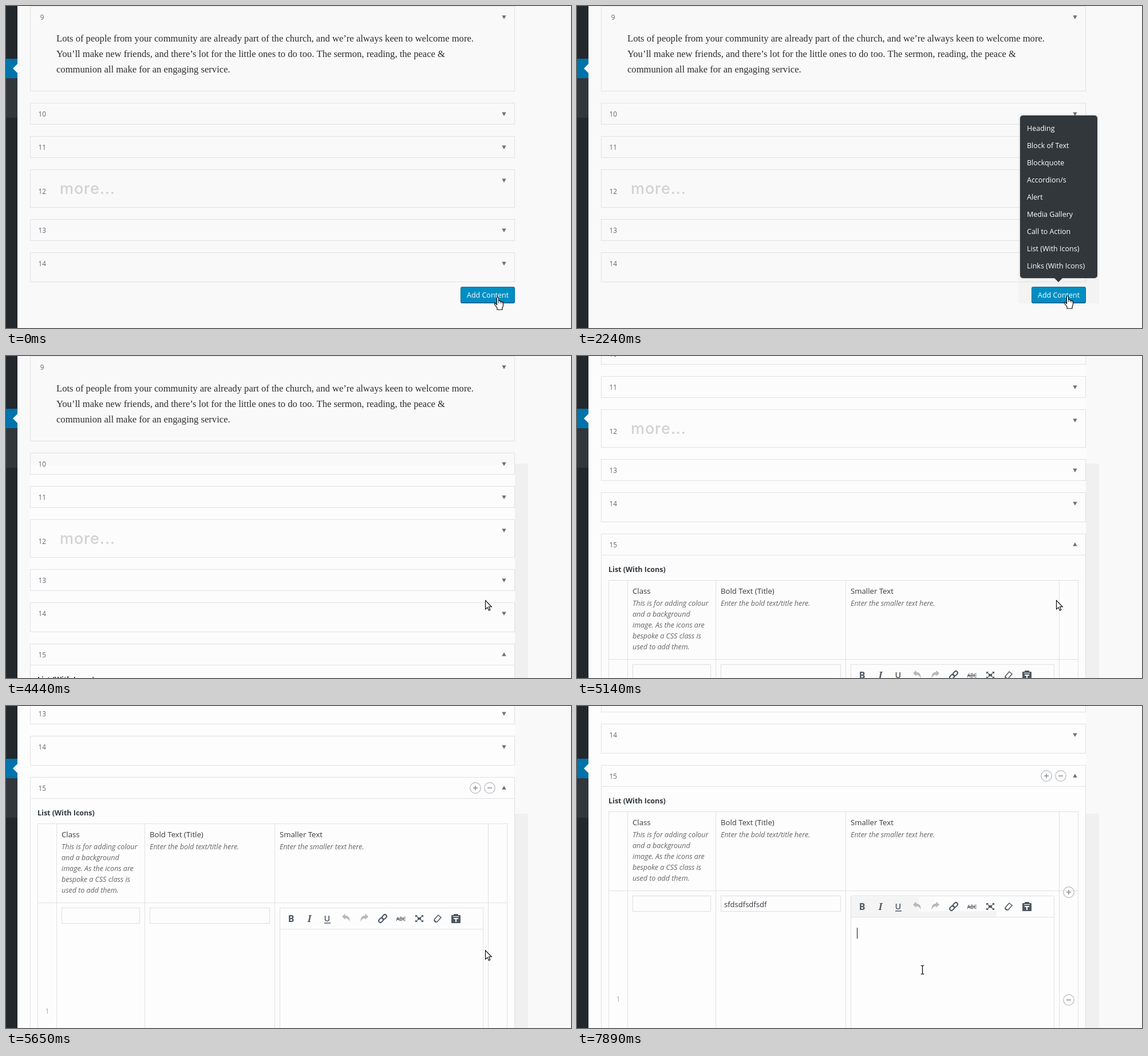
Write an HTML page with a canvas that moves like this. It is 987x562 px and loops after 8 s.

```html
<!DOCTYPE html>
<html lang="en">
<head>
<meta charset="utf-8">
<title>Adding a content block</title>
<style>
html, body { margin: 0; width: 100%; height: 100%; overflow: hidden; background: #f9f9f9; }
canvas { display: block; }
</style>
</head>
<body>
<canvas id="stage" width="987" height="562"></canvas>
<script>
const ctx = document.getElementById('stage').getContext('2d');
const LOOP = 8000;
const SANS = '"Open Sans", "Noto Sans", sans-serif';
const UI = '12.5px ' + SANS;
const LABEL = '11.7px ' + SANS;
const LINE = '#e1e1e1';
const ICON = '#4f5862';

// Page boxes: label, top, height, label baseline, toggle centre
const boxes = [
  [9, 0, 149, 24, 20], [10, 169, 38, 193, 189], [11, 227, 38, 251, 247],
  [12, 285, 67, 328, 305], [13, 372, 38, 396, 392], [14, 430, 52, 454, 450]
];
const story = [
  'Lots of people from your community are already part of the church, and we’re always keen to welcome more.',
  'You’ll make new friends, and there’s lot for the little ones to do too. The sermon, reading, the peace &',
  'communion all make for an engaging service.'
];
const menuItems = ['Heading', 'Block of Text', 'Blockquote', 'Accordion/s', 'Alert',
  'Media Gallery', 'Call to Action', 'List (With Icons)', 'Links (With Icons)'];
const classHelp = ['This is for adding colour', 'and a background', 'image. As the icons are',
  'bespoke a CSS class is', 'used to add them.'];
const typed = 'sfdsdfsdfsdf';

const scrollSteps = [[0, 0], [5040, 60], [5080, 128], [5140, 192], [5200, 300], [5320, 378], [5720, 399]];

// Pointer moves: start, end, x, y (equal times make a jump)
const moves = [
  [0, 0, 859, 508], [2240, 2240, 857, 506], [2270, 2270, 856, 505], [2540, 2540, 856, 503],
  [3350, 3950, 839, 430], [4280, 4280, 838, 427], [4440, 4440, 837, 426],
  [5740, 6240, 390, 341], [7420, 7740, 603, 460]
];

const handPath = new Path2D('M-1.5 2V13.5L-4 11.3Q-6.3 11 -5.5 13L-1 19V22H8V19Q10 16 9.5 10Q9 8 7 8.5' +
  'Q6.5 7 4.5 7.5Q3.5 6 1.5 6.7V2Q1.5 0 0 0T-1.5 2Z');
const handCreases = new Path2D('M1.5 6.7V11M4.5 7.5V11M7 8.5V11.5');
const arrowPath = new Path2D('M.5 .5V16L4 12.8L6.5 18L8.8 17L6.4 11.8H11.3Z');
const beamPath = new Path2D('M-3 -7.5H-1L0 -6.5L1 -7.5H3M0 -6.5V6.5M-3 7.5H-1L0 6.5L1 7.5H3');

const undoPath = new Path2D('M-7 -2.5L-1.5 -7.5V-4.3C4 -4.3 7 -1 6.5 7C5 2.5 2.5 .5 -1.5 .6V3Z');
const eraserPath = new Path2D('M-6 2L1 -6L6 -2L-1 6H-4L-6 4Z');
const expandPath = new Path2D('M-7 -6H-3L-7 -2ZM7 -6H3L7 -2ZM-7 6H-3L-7 2ZM7 6H3L7 2ZM-3 -2H3V2H-3Z');

function rect(x, y, w, h, color) {
  ctx.fillStyle = color;
  ctx.fillRect(x, y, w, h);
}

function frame(x, y, w, h, color = LINE) {
  ctx.strokeStyle = color;
  ctx.lineWidth = 1;
  ctx.strokeRect(x + .5, y + .5, w - 1, h - 1);
}

function text(str, x, y, color, font = UI, align = 'left') {
  ctx.font = font;
  ctx.fillStyle = color;
  ctx.textAlign = align;
  ctx.fillText(str, x, y);
}

function poly(color, ...pts) {
  ctx.fillStyle = color;
  ctx.beginPath();
  for (let i = 0; i < pts.length; i += 2) ctx.lineTo(pts[i], pts[i + 1]);
  ctx.fill();
}

function at(x, y, draw) {
  ctx.save();
  ctx.translate(x, y);
  draw();
  ctx.restore();
}

function stroke(path, color, width = 1) {
  ctx.strokeStyle = color;
  ctx.lineWidth = width;
  ctx.stroke(path);
}

function rounded(x, y, w, h, r, color) {
  ctx.fillStyle = color;
  ctx.beginPath();
  ctx.roundRect(x, y, w, h, r);
  ctx.fill();
}

function toggle(y, dir) {
  poly('#6b7078', 866.3, y - 3.2 * dir, 873.7, y - 3.2 * dir, 870, y + 3.2 * dir);
}

function roundButton(x, y, plus) {
  ctx.strokeStyle = '#b4b9be';
  ctx.lineWidth = 1.2;
  ctx.beginPath();
  ctx.arc(x, y, 9.3, 0, 7);
  ctx.stroke();
  rect(x - 4, y - .75, 8, 1.5, '#8b9096');
  if (plus) rect(x - .75, y - 4, 1.5, 8, '#8b9096');
}

function scrollAt(t) {
  return scrollSteps.filter(s => t >= s[0]).pop()[1];
}

function pointerAt(t) {
  let [, , x, y] = moves[0];
  for (const [from, to, tx, ty] of moves) {
    if (t < from) break;
    const k = t >= to ? 1 : (t - from) / (to - from);
    const e = k * k * (3 - 2 * k);
    x += (tx - x) * e;
    y += (ty - y) * e;
  }
  return [Math.round(x), Math.round(y)];
}

function typedCount(t) {
  if (t < 6810) return 0;
  if (t < 6890) return 1;
  if (t < 7040) return 3;
  return Math.min(typed.length, 4 + Math.floor((t - 7040) / 45));
}

function drawBoxes() {
  for (const [label, top, height, base, toggleY] of boxes) {
    frame(42, top, 847, height);
    text(label, 63.2, base, '#5d6370', LABEL, 'center');
    toggle(toggleY - .3, 1);
  }
  story.forEach((s, i) => text(s, 88, 62 + 27 * i, '#2d2d2d', '16.6px "Liberation Serif", "Noto Serif", serif'));
  ctx.letterSpacing = '0.9px';
  text('more...', 94, 328, '#d2d2d2', '500 27px Inter, sans-serif');
  ctx.letterSpacing = '0px';
}

function drawToolbar(y) {
  text('B', 498, y + 6, ICON, 'bold 16px ' + SANS, 'center');
  text('I', 530, y + 6, ICON, 'italic bold 16px "Noto Serif", serif', 'center');
  text('U', 561, y + 5, ICON, '600 14.5px ' + SANS, 'center');
  rect(556, y + 7, 11, 1.5, ICON);
  ctx.fillStyle = '#b5b9bd';
  at(594, y - 1, () => ctx.fill(undoPath));
  at(626, y - 1, () => { ctx.scale(-1, 1); ctx.fill(undoPath); });
  at(658, y, () => {
    ctx.rotate(-Math.PI / 4);
    ctx.strokeStyle = ICON;
    ctx.lineWidth = 2;
    for (const x of [-8.5, -.5]) {
      ctx.beginPath();
      ctx.roundRect(x, -3, 9, 6, 3);
      ctx.stroke();
    }
  });
  text('ABC', 690, y + 3.5, ICON, '600 8.5px ' + SANS, 'center');
  rect(682, y, 16, 1, ICON);
  ctx.fillStyle = ICON;
  at(722, y, () => {
    ctx.fill(expandPath);
    stroke(new Path2D('M-6 -5L6 5M6 -5L-6 5'), ICON, 1.2);
  });
  at(754, y, () => {
    stroke(eraserPath, ICON, 1.5);
    poly(ICON, -6, 2, -1, 6, -4, 6, -6, 4);
  });
  at(786, y, () => {
    rounded(-8, -6, 16, 14, 1, ICON);
    rounded(-4, -8, 8, 5, 1, ICON);
    rect(-5, -4, 10, 1, '#fff');
    rect(-4, -1, 8, 2, '#fff');
    rect(-1, -1, 2, 7, '#fff');
  });
}

function drawListBlock(t) {
  const heading = '13.2px ' + SANS;
  const help = 'italic ' + UI;
  frame(42, 502, 847, 600);
  rect(42, 539, 847, 1, LINE);
  text(15, 63.2, 526, '#5d6370', LABEL, 'center');
  toggle(520.5, -1);
  if (t >= 5570) {
    roundButton(820, 521, true);
    roundButton(845, 521, false);
  }
  text('List (With Icons)', 55, 569, '#32373c', 'bold ' + UI);

  for (const x of [55, 88, 242, 469, 842, 875]) rect(x, 583, 1, 500, LINE);
  for (const y of [583, 721]) rect(55, y, 821, 1, LINE);
  text('Class', 97, 607, '#3a3a3a', heading);
  text('Bold Text (Title)', 251, 607, '#3a3a3a', heading);
  text('Smaller Text', 478, 607, '#3a3a3a', heading);
  classHelp.forEach((s, i) => text(s, 97, 628 + 19 * i, '#666', help));
  text('Enter the bold text/title here.', 251, 628, '#666', help);
  text('Enter the smaller text here.', 478, 628, '#666', help);
  text(1, 72, 915, '#aaa', UI, 'center');

  const focused = t >= 6380 && t < 7890;
  frame(97, 730, 137, 28, '#ddd');
  frame(251, 730, 210, 28, focused ? '#5b9dd9' : '#ddd');
  const value = typed.slice(0, typedCount(t));
  text(value, 257, 750, '#32373c', '13px ' + SANS);
  if (focused && t >= 6430) {
    rect(Math.round(257 + ctx.measureText(value).width), 737, 1, 16, '#222');
  }

  if (t >= 5720) {
    rect(479, 732, 145, 35, '#f4f4f4');
    rect(597, 732, 27, 26, '#fafafa');
    rect(624, 757, 109, 10, '#f4f4f4');
    roundButton(859, 724, true);
    roundButton(859, 912, false);
  }
  frame(478, 730, 356, 400);
  rect(478, 767, 356, 1, LINE);
  drawToolbar(749);
  if (t >= 7890) rect(489, 786, 1, 19, '#111');
}

function drawAddButton(t, over) {
  const pressed = t >= 60 && t < 430;
  rounded(794, 490, 95, 29, 3, '#006799');
  rounded(795, 491, 93, 26, 2, pressed ? '#0073aa' : over ? '#008ec2' : '#0085ba');
  if (pressed) rect(796, 491, 91, 2, '#006799');
  text('Add Content', 805, 509, '#fff');
}

function drawMenu(t, y) {
  ctx.globalAlpha = t < 460 ? .5 : 1;
  ctx.shadowColor = 'rgba(0,0,0,.2)';
  ctx.shadowBlur = 3;
  rounded(774, 191, 135, 284, 5, '#32373c');
  ctx.shadowColor = 'transparent';
  poly('#32373c', 833, 474, 849, 474, 841, 482);
  const hover = y < 438 ? 7 : y < 468 ? 8 : -1;
  if (hover >= 0) {
    const top = 198 + 30 * hover;
    if (t >= 4280) {
      rect(772, top - 2, 139, 34, 'rgba(30,140,190,.45)');
      rect(773, top - 1, 137, 32, '#5b9dd9');
    }
    rect(774, top, 135, 30, '#0073aa');
  }
  menuItems.forEach((s, i) => text(s, 786, 218 + 30 * i, '#fff'));
  ctx.globalAlpha = 1;
}

function drawSidebar() {
  rect(0, 0, 20, 562, '#23282d');
  rect(0, 92, 20, 34, '#0073aa');
  rect(0, 126, 20, 69, '#32373c');
  poly('#f9f9f9', 20, 101, 20, 117, 12, 109);
}

function pointerKind(t, x, y) {
  if (t < 4440) return y >= 490 || y < 468 ? 'hand' : 'arrow';
  const inEditor = x > 478 && x < 833 && y > 369;
  const inInput = x > 251 && x < 461 && y > 331 && y < 359;
  return t >= 5720 && (inEditor || inInput) ? 'beam' : 'arrow';
}

function drawPointer(t, x, y) {
  at(x, y, () => {
    const kind = pointerKind(t, x, y);
    if (kind === 'beam') {
      ctx.translate(.5, .5);
      return stroke(beamPath, '#000', 1.2);
    }
    const path = kind === 'hand' ? handPath : arrowPath;
    ctx.fillStyle = '#fff';
    ctx.fill(path);
    stroke(path, '#000', 1.1);
    if (kind === 'hand') stroke(handCreases, '#000', .8);
  });
}

function draw(t) {
  const [x, y] = pointerAt(t);
  const added = t >= 4440;
  const menuOpen = t >= 430 && !added;

  rect(0, 0, 987, 562, '#f9f9f9');
  if (added) {
    const paper = t < 5570 ? '#fcfcfc' : '#fdfdfd';
    if (t < 5040) rect(42, 190, 847, 372, paper);
    else rect(20, 0, 869, 562, paper);
    rect(889, 188, 23, 374, '#f0f0f0');
  } else if (t >= 460) {
    rect(771, 188, 141, 331, '#f3f3f3');
    if (t >= 3350) rect(849, 519, 20, 13, '#f3f3f3');
  }

  at(0, -scrollAt(t), () => {
    drawBoxes();
    if (added) drawListBlock(t);
  });
  drawSidebar();
  if (!added) drawAddButton(t, y >= 490);
  if (menuOpen) drawMenu(t, y);
  drawPointer(t, x, y);
}

const start = performance.now();
function tick() {
  draw((performance.now() - start) % LOOP);
  requestAnimationFrame(tick);
}
tick();
</script>
</body>
</html>
```
